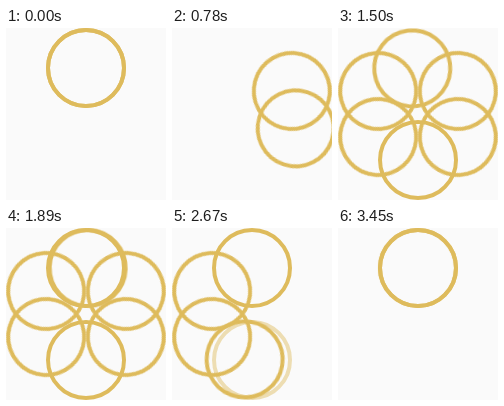
An HTML page that plays this animation: 160 px wide and 172 px high, repeating every 3.48 s.

```html
<!DOCTYPE html>
<html lang="en">
<head>
<meta charset="utf-8">
<title>Ring flower loader</title>
<style>
  html, body {
    margin: 0;
    width: 100%;
    height: 100%;
    overflow: hidden;
    background: #fafafa;
  }

  svg {
    --loop: 3480ms;
    display: block;
    width: 160px;
    height: 172px;
    overflow: hidden;
  }

  circle {
    cx: 80px;
    cy: 40px;
    r: 38px;
    fill: none;
    stroke: #debb5c;
    stroke-width: 4px;
    transform-origin: 80px 86px;
    transform: rotate(var(--angle));
  }

  /* Visible for half a loop, starting as the orbiting ring passes by */
  .petal {
    animation: toggle var(--loop) linear calc(var(--pass) - var(--loop)) infinite;
  }

  .orbit {
    animation: orbit calc(var(--loop) / 2) cubic-bezier(.69, 0, .38, 1) infinite;
  }

  @keyframes toggle {
    0%        { opacity: 0; }
    1%, 50%   { opacity: 1; }
    51%, 100% { opacity: 0; }
  }

  @keyframes orbit {
    from { transform: rotate(0deg); }
    to   { transform: rotate(360deg); }
  }
</style>
</head>
<body>
  <svg viewBox="0 0 160 172">
    <circle class="petal" style="--angle: 60deg; --pass: 633ms"/>
    <circle class="petal" style="--angle: 120deg; --pass: 802ms"/>
    <circle class="petal" style="--angle: 180deg; --pass: 912ms"/>
    <circle class="petal" style="--angle: 240deg; --pass: 1017ms"/>
    <circle class="petal" style="--angle: 300deg; --pass: 1170ms"/>
    <circle class="petal" style="--angle: 0deg; --pass: 1740ms"/>
    <circle class="orbit"/>
  </svg>
</body>
</html>
```
